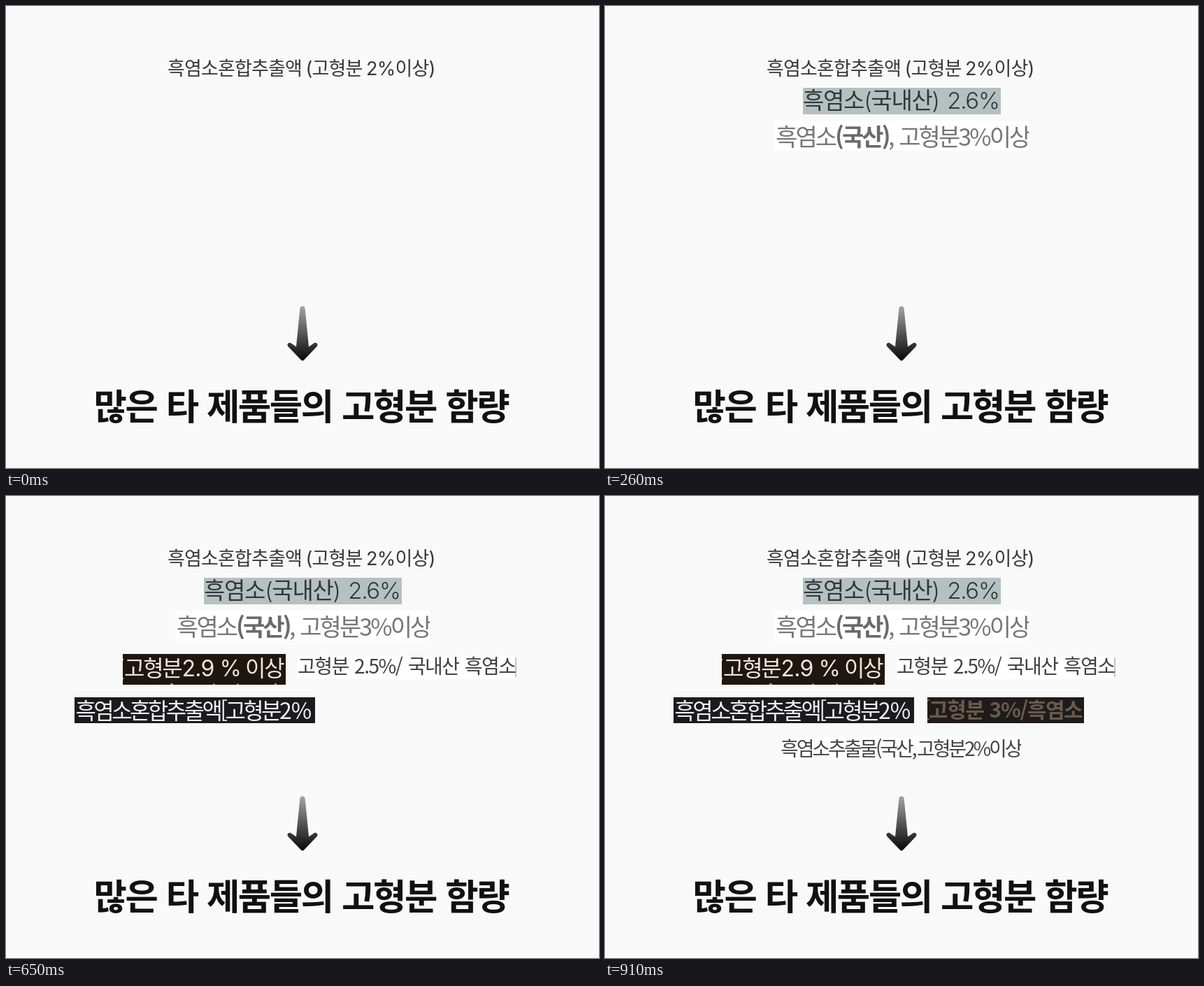
An HTML page for the animation above (2940 ms loop, 848 px wide and 661 px high).

```html
<!DOCTYPE html>
<html lang="ko">
<head>
<meta charset="utf-8">
<style>
html, body { margin: 0; width: 100%; height: 100%; overflow: hidden; background: #f9f9f9; }
svg { display: block; }
text { font-family: "Noto Sans CJK KR", "Noto Sans CJK", sans-serif; }
.inter { font-family: Inter, "Noto Sans CJK KR", "Noto Sans CJK", sans-serif; }
</style>
</head>
<body>
<svg id="stage" width="848" height="661" viewBox="0 0 848 661">
  <defs>
    <linearGradient id="fade" x1="0" y1="0" x2="0" y2="1">
      <stop offset="0" stop-color="#a4a4a4"/>
      <stop offset=".5" stop-color="#555"/>
      <stop offset="1" stop-color="#080808"/>
    </linearGradient>
  </defs>
  <path fill="url(#fade)" d="M420.4 432.5Q421 429.5 424 429.5Q427 429.5 427.6 432.5L433 487.5L441 482Q444 480.8 445.5 484Q445.8 486 444.3 487.5L426 506.5Q424 508.5 422 506.5L403.7 487.5Q402.2 486 402.5 484Q404 480.8 407 482L415 487.5Z"/>
  <text x="125.5" y="592" font-size="51.5" font-weight="700" fill="#111" letter-spacing="-2.4" word-spacing="1.2">많은 타 제품들의 고형분 함량</text>
</svg>
<script>
const LOOP = 2940, STEP = 130;
const NS = "http://www.w3.org/2000/svg";
const stage = document.getElementById("stage");

// Each label: clip box, background, text style, runs of [x, text, overrides], marks of [x, y, w, h]
const labels = [
  { box: [225, 68, 395, 42], bg: "none", fill: "#383838", size: 27, y: 98.5, gap: -0.84, font: "inter",
    runs: [[231, "흑염소혼합추출액 (고형분 2%이상)", { "word-spacing": -1.2 }]] },
  { box: [283, 117, 283, 38], bg: "#b5c0c1", fill: "#30383a", size: 33, y: 146.5, gap: -1.3, font: "inter", weight: 300,
    runs: [[283, "흑염소(국내산) 2.6%", { "word-spacing": 3.5 }]] },
  { box: [243, 164, 363, 43], bg: "#fff", fill: "#777", size: 34, y: 200, gap: -2.9,
    runs: [[244, "흑염소"], [329, "(국산)", { fill: "#6a6a6a", "font-weight": 700 }],
           [405, ", 고형분3%이상", { "word-spacing": 2 }]] },
  { box: [167, 226, 233, 44], bg: "#1e160f", fill: "#ebe5de", size: 32, y: 258, gap: -2.3, font: "inter",
    runs: [[158, "["], [169, "고형분"], [251.5, "2.9", { "letter-spacing": -0.8 }], [305.5, "%"], [342, "이상"]],
    marks: [[235, 268, 4, 2], [296, 268.5, 3, 1.5], [330, 268.5, 3, 1.5], [384, 268, 3, 2]] },
  { box: [417, 229, 313, 33], bg: "#fff", fill: "#3e3e3e", size: 28, y: 254, gap: -1.5,
    runs: [[417, "고형분 2.5%/ 국내산 흑염소", { "word-spacing": 2 }]],
    marks: [[728.5, 231, 1, 28]] },
  { box: [98, 288, 344, 37], bg: "#1b1a1f", fill: "#f0f0f0", size: 32, y: 318.5, gap: -3.6,
    runs: [[99.5, "흑염소혼합추출액[고형분"], [391, "2%", { "letter-spacing": -1 }]] },
  { box: [461, 288, 224, 37], bg: "#201b1a", fill: "#665b4d", size: 30, y: 317, gap: -1.4, weight: 700,
    runs: [[454, "["], [463, "고형분 3%/흑염소(", { "word-spacing": 1 }]] },
  { box: [252, 345, 343, 32], bg: "#fdfdfd", fill: "#444", size: 28, y: 372, gap: -3.1,
    runs: [[251, "흑염소추출물(국산,"], [446, "고형분2%이상)"]] }
];

function add(parent, tag, attrs, text) {
  const el = document.createElementNS(NS, tag);
  for (const k in attrs) el.setAttribute(k, attrs[k]);
  if (text) el.textContent = text;
  return parent.appendChild(el);
}

const groups = labels.map(l => {
  const [x, y, width, height] = l.box;
  const g = add(stage, "g", {});
  const clip = add(g, "svg", { x, y, width, height, viewBox: l.box.join(" "), overflow: "hidden" });
  add(clip, "rect", { x, y, width, height, fill: l.bg });
  for (const [tx, text, extra] of l.runs)
    add(clip, "text", { x: tx, y: l.y, fill: l.fill, "font-size": l.size, "letter-spacing": l.gap,
      "font-weight": l.weight || 400, class: l.font || "", ...extra }, text);
  for (const [mx, my, w, h] of l.marks || [])
    add(clip, "rect", { x: mx, y: my, width: w, height: h, fill: l.fill, opacity: .6 });
  return g;
});

let start;
function draw(now) {
  start ??= now;
  const t = (now - start) % LOOP;
  groups.forEach((g, i) => g.setAttribute("visibility", t >= i * STEP ? "visible" : "hidden"));
  requestAnimationFrame(draw);
}
requestAnimationFrame(draw);
</script>
</body>
</html>
```
